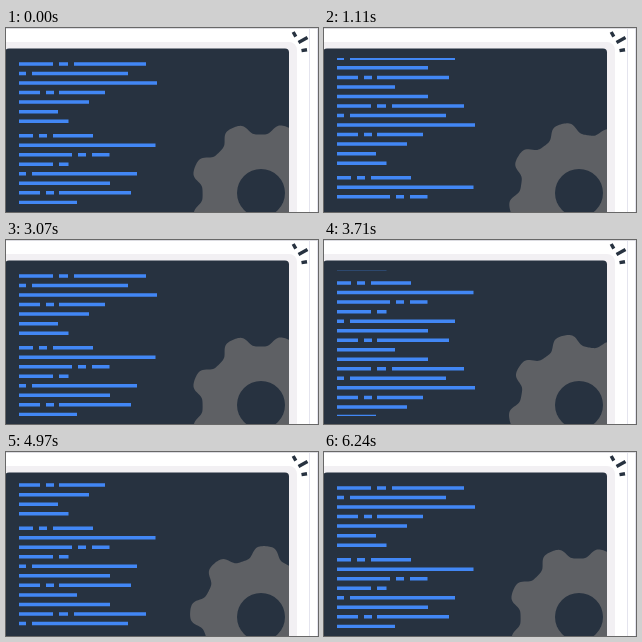
These frames come from a looping animation (312 px wide and 184 px high, 6.3 s). An HTML page:

```html
<!DOCTYPE html>
<html lang="en">
<head>
<meta charset="utf-8">
<title>Scrolling code and gear</title>
<style>
  html, body { margin: 0; width: 100%; height: 100%; overflow: hidden; background: #fff; }
  svg { display: block; width: 312px; height: 184px; }
</style>
</head>
<body>
<svg viewBox="0 0 312 184" xmlns="http://www.w3.org/2000/svg">
  <defs>
    <clipPath id="screen"><rect x="-1" y="20.5" width="284" height="180" rx="4"/></clipPath>
    <clipPath id="page"><rect x="0" y="30" width="283" height="146"/></clipPath>
  </defs>
  <rect width="312" height="184" fill="#fff"/>
  <path d="M0 .5H312" stroke="#dcdce1"/>
  <path d="M303.5 1V184M311.5 1V184" stroke="#e4e4ee"/>
  <rect x="-10" y="14" width="301" height="190" rx="8" fill="#f2f0f3"/>
  <rect x="-1" y="20.5" width="284" height="180" rx="4" fill="#273240"/>
  <g clip-path="url(#screen)">
    <path id="gear" fill="#5e6064"/>
    <circle cx="255" cy="165" r="24" fill="#273240"/>
  </g>
  <g clip-path="url(#page)"><path id="code" fill="#4287f5"/></g>
  <path d="M287.2 4L289.8 8.6M292.5 14.5L301.5 9.5M295.5 22.6L301 21.7" stroke="#273240" stroke-width="3.4"/>
</svg>
<script>
const LOOP = 6300;
const PITCH = 9.53, GAP = 14.5, BAR = 3.5;
const PERIOD = 15 * PITCH + GAP;
const TEETH = 8, CYCLE_TURN = 135;

// Each line of code as start-end pairs
const lines = [
  "13-47 53-62 68-140", "13-20 26-122", "13-151", "13-34 40-48 53-99",
  "13-83", "13-52", "13-62.5",
  "13-27 33-41 47-87", "13-149.5", "13-66 72-80 86-103.5", "13-47 53-62.5",
  "13-20 26-131", "13-104", "13-34 40-48 53-125", "13-71", "13-104"
];

// Ticks of the picture against time, and scroll (45 per cycle) against ticks
const ticks = [[0, 0], [760, 11], [1450, 21], [2150, 31], [2790, 40], [3490, 50],
  [4130, 59], [4830, 69], [5470, 78], [6170, 88], [LOOP, 90]];
const scroll = [[0, 0], [16, 33], [29, 59], [44, 90], [63, 129], [71, 144], [89, 180], [90, 180]];

function interpolate(points, x) {
  let i = 1;
  while (i < points.length - 1 && x >= points[i][0]) i++;
  const [x0, y0] = points[i - 1], [x1, y1] = points[i];
  return y0 + (y1 - y0) * (x - x0) / (x1 - x0);
}

function codePath() {
  let d = "";
  for (let copy = 0; copy < 2; copy++) {
    lines.forEach((line, i) => {
      const y = 36 - BAR / 2 + copy * PERIOD + i * PITCH + (i > 6 ? GAP - PITCH : 0);
      for (const bar of line.split(" ")) {
        const [a, b] = bar.split("-").map(Number);
        d += `M${a} ${y}H${b}v${BAR}H${a}Z`;
      }
    });
  }
  return d;
}

function gearPath() {
  const points = [];
  for (let deg = 0; deg < 360; deg++) {
    const a = deg * Math.PI / 180;
    const r = 64.7 + 6.3 * Math.tanh(1.8 * Math.cos(TEETH * a)) / Math.tanh(1.8);
    points.push(`${(r * Math.sin(a)).toFixed(2)} ${(-r * Math.cos(a)).toFixed(2)}`);
  }
  return "M" + points.join("L") + "Z";
}

const code = document.getElementById("code");
const gear = document.getElementById("gear");
code.setAttribute("d", codePath());
gear.setAttribute("d", gearPath());

function draw(time) {
  const tick = Math.floor(interpolate(ticks, time % LOOP) + 0.08);
  const cycles = interpolate(scroll, tick) / 45;
  code.setAttribute("transform", `translate(0 ${-(cycles % 1) * PERIOD})`);
  gear.setAttribute("transform", `translate(255 165) rotate(${22 + cycles * CYCLE_TURN})`);
}

const start = performance.now();
function loop() {
  draw(performance.now() - start);
  requestAnimationFrame(loop);
}
loop();
</script>
</body>
</html>
```
